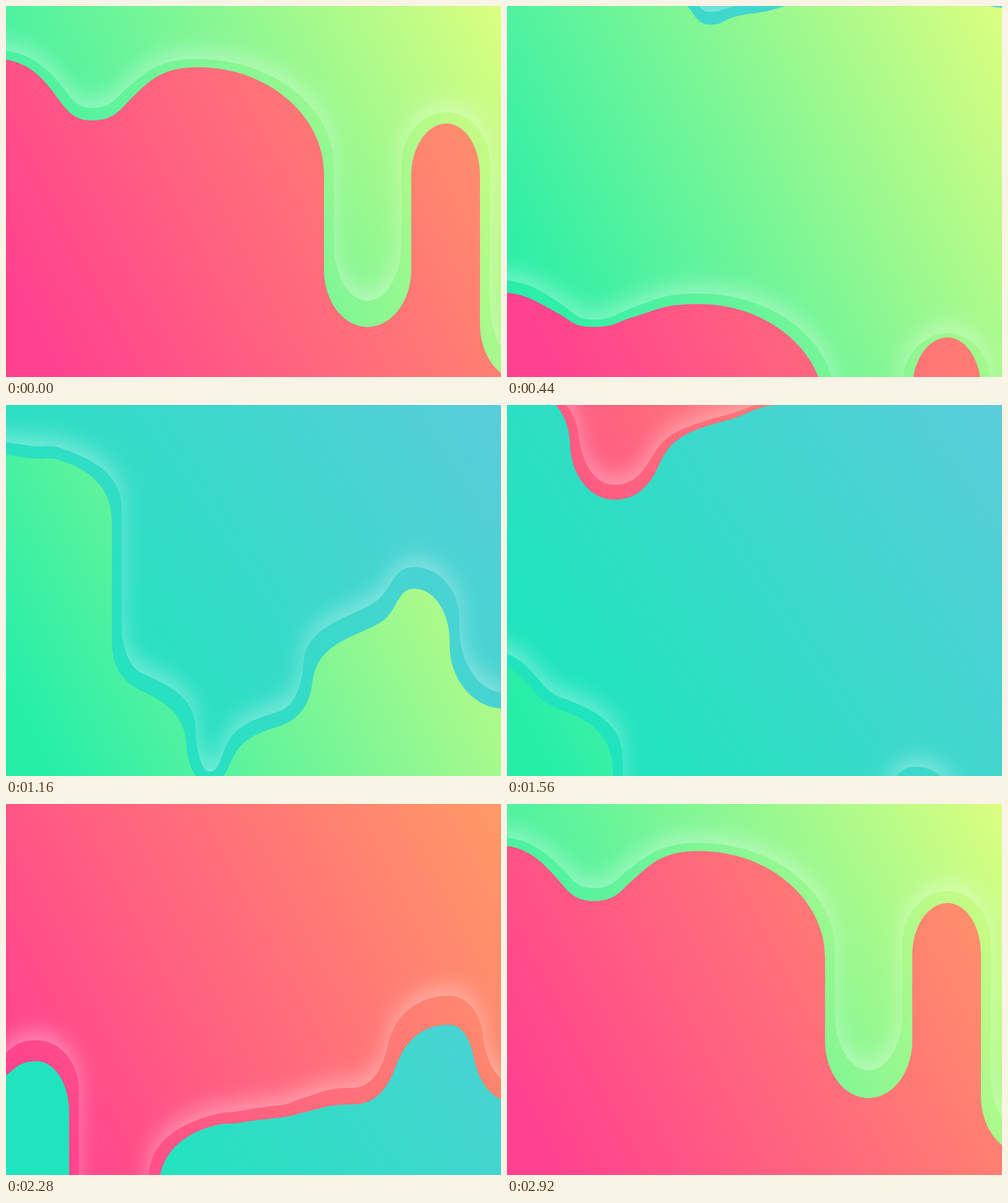
An HTML page with a canvas for the animation above (2.96 s loop, 800x600 px).

```html
<!DOCTYPE html>
<html lang="en">
<head>
<meta charset="utf-8">
<title>Dripping paint</title>
<style>
html, body { margin: 0; width: 100%; height: 100%; overflow: hidden; }
canvas { display: block; }
</style>
</head>
<body>
<canvas id="stage" width="800" height="600"></canvas>
<script>
const LOOP = 2960, STEP = 40, RIM = 16, ROUND = 0.55;
const ctx = document.getElementById('stage').getContext('2d');

function gradient(x0, y0, x1, y1, from, to) {
  const g = ctx.createLinearGradient(x0, y0, x1, y1);
  g.addColorStop(0, from);
  g.addColorStop(1, to);
  return g;
}

// A tip, peak or shoulder of the edge: its place, the x of the wall that follows it,
// its heights at the layer's times, its rim from first to last, and its slope.
const knot = (x, wall, heights, rims, slope = 0) => ({ x, wall, heights, rims, slope });

const layers = [
  {
    start: 2400, times: [2400, 2960, 3400], rimTimes: [2920, 3400],
    fill: gradient(0, 455, 816, 30, '#26eea9', '#dcfe80'),
    knots: [
      knot(-30, 78, [-180, 84, 462], [13, 20]),
      knot(140, 205, [-207, 185, 519], [21, 12]),
      knot(310, 514, [-223, 99, 482], [13, 17]),
      knot(584, 655, [-90, 519, 885], [45, 14]),
      knot(712, 766, [-230, 190, 536], [19, 7]),
      knot(838, 0, [20, 608, 960], [34, 20])
    ]
  },
  {
    start: 360, times: [440, 840, 1160, 1560], rimTimes: [840, 1160],
    fill: gradient(0, 300, 691, -166, '#20e4bd', '#5accdb'),
    knots: [
      knot(-40, 40, [-300, -75, 79, 416], [10, 20]),
      knot(95, 171, [-200, -20, 92, 496], [7, 20], 0.35),
      knot(220, 291, [-40, 129, 463, 832], [18, 29], 0.45),
      knot(329, 365, [30, 377, 614, 975], [51, 21]),
      knot(440, 495, [3, 226, 520, 885], [31, 24], -0.3),
      knot(565, 625, [-80, 87, 371, 735], [13, 36], -0.45),
      knot(660, 717, [-110, 64, 297, 620], [8, 35]),
      knot(805, 0, [3, 188, 491, 820], [28, 26])
    ]
  },
  {
    start: 1360, times: [1560, 2280], rimTimes: [1560, 2280],
    fill: gradient(0, 455, 816, 30, '#ff418f', '#ff9a66'),
    knots: [
      knot(-40, 0, [-200, 460], [8, 30]),
      knot(50, 102, [-13, 416], [8, 34]),
      knot(173, 247, [153, 810], [24, 25]),
      knot(330, 380, [32, 522], [9, 18], -0.3),
      knot(437, 485, [0, 508], [6, 20], -0.1),
      knot(560, 630, [-32, 486], [6, 27]),
      knot(716, 757, [-165, 357], [6, 47]),
      knot(830, 0, [-35, 485], [6, 29])
    ]
  }
];

// Value at a time, straight between the given times and onward beyond them.
function at(times, values, t) {
  let i = 0;
  while (i < times.length - 2 && t >= times[i + 1]) i++;
  const k = (t - times[i]) / (times[i + 1] - times[i]);
  return values[i] + (values[i + 1] - values[i]) * k;
}

const clamp = (v, lo, hi) => Math.min(hi, Math.max(lo, v));

// Area between the edge and a level line. Each pair of knots is joined by two rounded
// corners and an upright wall; where the drop is too short for a wall, the join leans.
function area(knots, inset, level) {
  const path = new Path2D(), first = knots[0], last = knots[knots.length - 1];
  path.moveTo(first.x, first.y);
  knots.slice(1).forEach((q, i) => {
    const p = knots[i], drop = q.y - p.y, dir = Math.sign(drop);
    const radius = w => 0.6 * w + 50;
    const r0 = radius(p.wall - p.x), r1 = radius(q.x - p.wall);
    const fit = Math.min(1, Math.abs(drop) / (r0 + r1));
    const lean = 0.5 * (1 - fit) * (q.x - p.x) / (r0 + r1);
    const x = p.wall + inset * fit * dir;
    const w0 = (x - p.x) * ROUND, w1 = (q.x - x) * ROUND;
    const a = r0 * fit * dir, b = r1 * fit * dir;
    const top = p.y + a, end = q.y - b;
    path.bezierCurveTo(p.x + w0, p.y + w0 * p.slope, x - lean * r0, top - a * ROUND, x, top);
    path.lineTo(x, end);
    path.bezierCurveTo(x + lean * r1, end + b * ROUND, q.x - w1, q.y - w1 * q.slope, q.x, q.y);
  });
  path.lineTo(last.x, level);
  path.lineTo(first.x, level);
  path.closePath();
  return path;
}

function drawLayer({ start, times, rimTimes, fill, knots }, t) {
  const rimTime = clamp(t, ...rimTimes), growth = Math.min(1, (t - start) / 200);
  const edge = knots.map(k => ({ ...k, y: at(times, k.heights, t) }));
  const inner = edge.map(k => ({ ...k, y: k.y - growth * at(rimTimes, k.rims, rimTime) }));
  ctx.fillStyle = fill;
  ctx.fill(area(edge, 0, -4000));

  // Soft light inside the rim, cast by a shape standing off stage.
  ctx.save();
  ctx.clip(area(inner, RIM, -4000));
  ctx.shadowColor = 'rgba(255,255,255,.34)';
  ctx.shadowBlur = 34;
  ctx.shadowOffsetX = 2000;
  ctx.shadowOffsetY = -15;
  ctx.translate(-2000, 0);
  ctx.fillStyle = '#fff';
  ctx.fill(area(inner, RIM, 1500));
  ctx.restore();
}

function frame() {
  const now = Math.floor(performance.now() / STEP) * STEP % LOOP;
  layers
    .map(layer => ({ layer, age: (now - layer.start + LOOP) % LOOP }))
    .sort((a, b) => b.age - a.age)
    .forEach(({ layer, age }) => drawLayer(layer, layer.start + age));
  requestAnimationFrame(frame);
}
frame();
</script>
</body>
</html>
```
